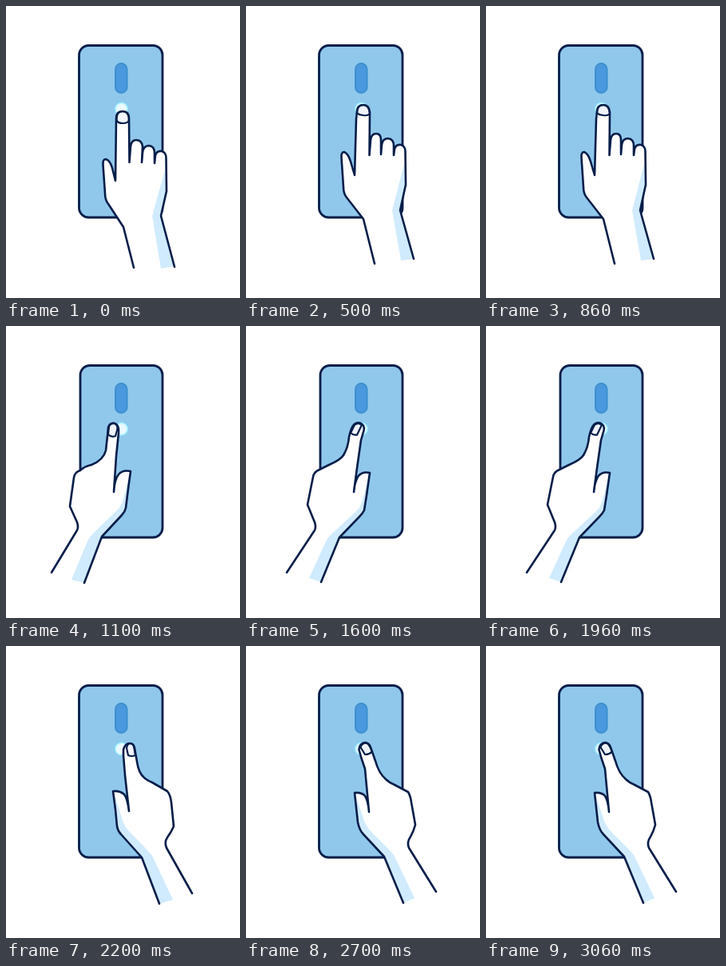
These frames come from a looping animation (293x366 px, 3.3 s). An HTML page:

```html
<!DOCTYPE html>
<html lang="en">
<head>
<meta charset="utf-8">
<title>Fingerprint sensor</title>
<style>
  html, body { margin: 0; width: 100%; height: 100%; overflow: hidden; background: #fff; }
  svg { display: block; width: 100%; height: 100%; }
  .ink { fill: none; stroke: #031d49; stroke-width: 2.6; stroke-linejoin: round; stroke-linecap: round; }
  .skin { fill: #fff; }
  .shade { fill: #d0ebfd; }
  .nail { fill: #f0f5fc; stroke: #031d49; stroke-width: 2.2; stroke-linejoin: round; }
</style>
</head>
<body>
<svg viewBox="0 0 293 366">
  <defs>
    <radialGradient id="glow">
      <stop offset=".6" stop-color="#ecfaff"/>
      <stop offset=".82" stop-color="#b9f3ff"/>
      <stop offset=".92" stop-color="#7fe3f9"/>
      <stop offset="1" stop-color="#7fe3f9" stop-opacity="0"/>
    </radialGradient>
  </defs>
  <g id="stage"></g>
</svg>
<script>
const LOOP = 3300;

// One entry per pose: start and end time, phone's left edge, hand outline, shading, nail.
const poses = [
  { from: 0, to: 500, left: 91.5,
    hand: 'M160 328L147 277L128 248Q124 243 124 235L121.5 199Q121 192 125 192Q130 193 133 203L137 219L138 141Q138 132 146 132Q154 132 154 141L154.5 196L156 176Q157 168 163 168Q170 168 171 176L170 196L171 184Q172 175 179 175Q186 176 186 184V197L187 187Q189 181 195 182Q201 184 200.5 191L201 232L194 263L211 327',
    shade: 'M199 206L183 263L194 329L211 326L194 263L201 232Z',
    nail: 'M138.5 143Q138 132 146 132Q154 132 154 143Q153 147 146 147Q140 147 138.5 143Z' },
  { from: 500, to: 1100, left: 91.5,
    hand: 'M161 323L147 267L126 240Q122 235 122 227L119.5 190Q119 183 123 183Q128 185 131 195L136 212L138 142L139 131Q140 124 147 124Q154 124 155 133L154.5 187L156 168Q157 160 163 160Q169 160 169 168V186L170 174Q171 166 178 166Q185 167 185 175V187L186 179Q188 173 194 174Q200 176 199.5 183L200 224L193 256L210 317',
    shade: 'M198 198L183 256L194 319L210 317L193 256L200 224Z',
    nail: 'M139 134Q139 124 147 124Q154 124 155 135Q152 138 147 137Q142 137 139 134Z' },
  { from: 1100, to: 1600, left: 93,
    hand: 'M57 309L89 256Q91 252 89 246L80 226L85 190Q86 183 93 181Q98 176 107 174Q122 168 125 156L127 138L128 127Q130 121 136 122Q142 124 141 134L138 163L135 208Q136 192 141 186Q146 180 156 182L153 204L150 228Q149 233 145 237L120 264L98 322',
    shade: 'M155 187L147 216Q145 226 138 232L109 260Q104 265 102 270L82 318L98 322L120 264L145 237Q149 233 150 228Z',
    nail: 'M128 136L129 126Q131 121 136 122Q141 125 139 131L137 138Q132 140 128 136Z' },
  { from: 1600, to: 2200, left: 93,
    hand: 'M51 309L86 256Q88 252 86 246L77 224L84 189Q85 183 92 180L104 174Q118 168 122 162Q128 152 129 139Q131 130 134 125Q138 120 144 122Q149 125 147.5 131L144 143L139 178L135 208Q136 196 140 189Q145 182 155 184L151 212L148 231Q146 235 142 239L117 265L94 321',
    shade: 'M154 188L146 218Q144 227 137 233L106 262Q102 266 100 270L79 316L94 321L117 265L142 239Q146 235 148 231Z',
    nail: 'M131 134L136 124Q140 120 145 124L139 136.5Q134 137 131 134Z' },
  { from: 2200, to: 2700, left: 91.5,
    hand: 'M192 323L170 265L144 236Q140 232 139 226L137 205L134 182Q143 181 148 186Q152 191 154 207L149 162L147 137V130Q149 122 155 122Q160 122 161 128L164 145Q166 160 174 166Q178 169 183 171L202 182Q206 187 207 196L210 226Q207 233 202 240Q198 246 201 253L233 310',
    shade: 'M136 187L144 212Q147 226 156 234L179 258Q183 262 186 269L209 318L192 323L170 265L144 236Q140 232 139 226Z',
    nail: 'M153 137L151 128Q152 122 156 122Q160 123 160.5 128L162 137Q157 139 153 137Z' },
  { from: 2700, to: 3300, left: 91.5,
    hand: 'M197 322L173 264L147 236Q142 231 140 221L136 184Q145 183 149 188Q153 194 154 208L149 154L144 139L141.5 130Q142 122 149 121Q154 121 156 127L162 144Q166 159 175 167Q179 171 186 174L203 183Q206 188 207 196L212 224Q210 232 206 239Q201 246 204 253L238 308',
    shade: 'M138 189L146 213Q149 226 158 234L181 257Q185 261 188 268L211 316L197 322L173 264L147 236Q142 231 140 221Z',
    nail: 'M149 136L143.5 127Q145 122 150 121.5Q153 122 155 126L158 132Q155 136 149 136Z' }
];

const phone = left => `
  <rect x="${left}" y="49.5" width="${196 - left}" height="215.5" rx="12" fill="#90c8ec" stroke="#031d49" stroke-width="2.8"/>
  <rect x="137" y="72" width="14.5" height="37" rx="7.25" fill="#4a98de" stroke="#3d90cd" stroke-width="2"/>
  <circle cx="144.5" cy="129" r="9" fill="url(#glow)"/>`;

const draw = p => `<g opacity="0">${phone(p.left)}
  <path class="skin" d="${p.hand}Z"/>
  <path class="shade" d="${p.shade}"/>
  <path class="nail" d="${p.nail}"/>
  <path class="ink" d="${p.hand}"/></g>`;

const stage = document.getElementById('stage');
stage.innerHTML = poses.map(draw).join('');

// Each pose is cut in and out without blending.
poses.forEach(({ from, to }, i) => {
  const a = from / LOOP, b = to / LOOP;
  const steps = [[0, 0], [a, 0], [a, 1], [b, 1], [b, 0], [1, 0]];
  const keys = steps.map(([offset, opacity]) => ({ offset, opacity }));
  const anim = stage.children[i].animate(keys, { duration: LOOP, iterations: Infinity });
  anim.startTime = 0;
});
</script>
</body>
</html>
```
